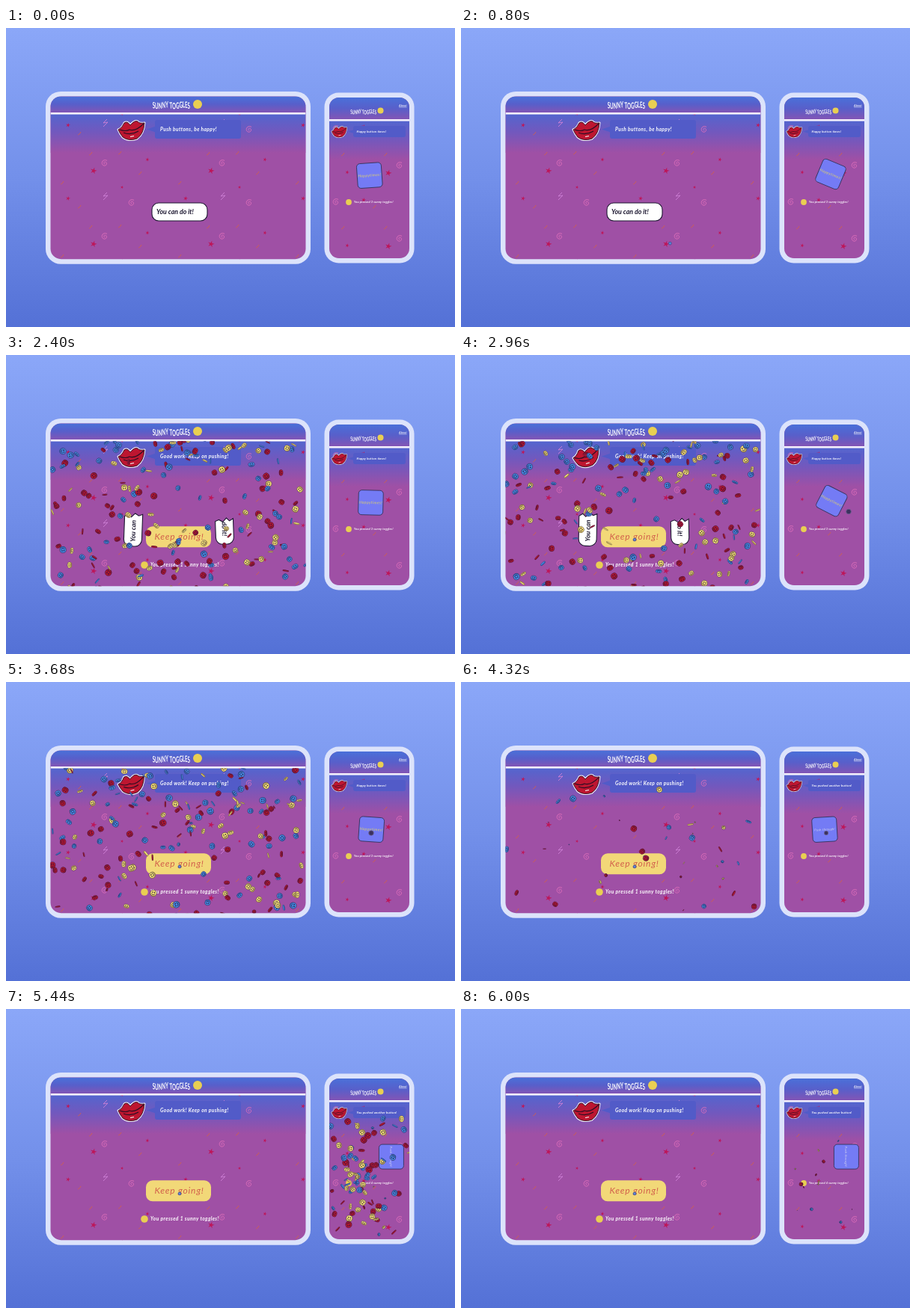
An HTML page with a canvas that plays this animation: 600x400 px, repeating every 6.08 s.

```html
<!DOCTYPE html>
<html lang="en">
<head>
<meta charset="utf-8">
<title>Sunny Toggles</title>
<style>
  html, body { margin: 0; width: 100%; height: 100%; overflow: hidden; background: #6f8ce8; }
  canvas { display: block; width: 600px; height: 400px; }
</style>
</head>
<body>
<canvas id="stage"></canvas>
<script>
const LOOP = 6080, BREAK = 1300, TAP = 4300, TAU = Math.PI * 2;
const FONT = 'Lato, "Open Sans", sans-serif';
const canvas = document.getElementById('stage');
const ctx = canvas.getContext('2d');
const ratio = Math.max(1, window.devicePixelRatio || 1);
canvas.width = 600 * ratio;
canvas.height = 400 * ratio;

function randomFrom(seed) {
  return () => {
    seed = (seed * 1664525 + 1013904223) >>> 0;
    return seed / 4294967296;
  };
}

// Eased value through [time, value] pairs.
function track(t, keys) {
  if (t <= keys[0][0]) return keys[0][1];
  for (let i = 1; i < keys.length; i++) {
    const [a, from] = keys[i - 1], [b, to] = keys[i];
    if (t < b) {
      const p = (t - a) / (b - a);
      return from + (to - from) * p * p * (3 - 2 * p);
    }
  }
  return keys[keys.length - 1][1];
}

function at(x, y, angle, draw) {
  ctx.save();
  ctx.translate(x, y);
  ctx.rotate(angle);
  draw();
  ctx.restore();
}

function box(x, y, w, h, r, fill, stroke, width = 1) {
  ctx.beginPath();
  ctx.roundRect(x, y, w, h, r);
  if (fill) { ctx.fillStyle = fill; ctx.fill(); }
  if (stroke) { ctx.strokeStyle = stroke; ctx.lineWidth = width; ctx.stroke(); }
}

function disc(x, y, r, fill, stroke, width = 0.8) {
  ctx.beginPath();
  ctx.arc(x, y, r, 0, TAU);
  ctx.fillStyle = fill;
  ctx.fill();
  if (stroke) { ctx.strokeStyle = stroke; ctx.lineWidth = width; ctx.stroke(); }
}

function text(str, x, y, size, color, { weight = 'bold', align = 'left', gap = size * 0.06 } = {}) {
  ctx.font = `italic ${weight} ${size}px ${FONT}`;
  ctx.letterSpacing = gap + 'px';
  ctx.textAlign = align;
  ctx.textBaseline = 'alphabetic';
  ctx.fillStyle = color;
  ctx.fillText(str, x, y);
  ctx.letterSpacing = '0px';
}

function shade(y0, y1, ...stops) {
  const g = ctx.createLinearGradient(0, y0, 0, y1);
  stops.forEach((c, i) => g.addColorStop(i / (stops.length - 1), c));
  return g;
}

const doodles = {
  spiral(s) {
    ctx.strokeStyle = '#e070ba';
    ctx.beginPath();
    for (let a = 0; a < 12; a += 0.3) {
      const r = a * 0.4 * s;
      ctx.lineTo(Math.cos(a) * r, Math.sin(a) * r);
    }
    ctx.stroke();
  },
  star(s) {
    ctx.fillStyle = '#bd1659';
    ctx.beginPath();
    for (let i = 0; i < 10; i++) {
      const r = (i % 2 ? 1.6 : 4.6) * s, a = i * TAU / 10 - 1.3;
      ctx.lineTo(Math.cos(a) * r, Math.sin(a) * r);
    }
    ctx.fill();
  },
  bolt() {
    ctx.strokeStyle = '#cf80d6';
    ctx.beginPath();
    ctx.moveTo(2, -5);
    ctx.lineTo(-3, 0);
    ctx.lineTo(3, -1);
    ctx.lineTo(-3, 5);
    ctx.stroke();
  },
  dash() {
    ctx.strokeStyle = '#d0604f';
    ctx.beginPath();
    ctx.moveTo(-1.8, 2);
    ctx.quadraticCurveTo(1, 1, 2, -2);
    ctx.stroke();
  }
};

const deskDoodles = [
  ['spiral', 132, 181, 1], ['spiral', 168, 234, 1], ['star', 117, 191, 1], ['star', 83, 130, 0.7],
  ['bolt', 133, 225, 1], ['star', 189, 176, 0.6], ['dash', 98, 141, 1], ['dash', 113, 168, 1],
  ['dash', 152, 167, 1], ['dash', 179, 194, 1], ['dash', 75, 207, 1], ['star', 155, 213, 0.5]
];
const phoneDoodles = [
  ['spiral', 526, 184, 1], ['spiral', 441, 233, 1], ['star', 511, 194, 1], ['star', 478, 230, 0.7],
  ['dash', 492, 239, 1], ['dash', 507, 267, 1], ['dash', 450, 267, 1], ['star', 456, 193, 0.6]
];

function pattern(list, x, y, w, h) {
  ctx.lineWidth = 0.9;
  for (const [kind, px, py, s] of list)
    for (let i = -2; i < 4; i++)
      for (let j = -2; j < 3; j++) {
        const dx = px + i * 157, dy = py + j * 98;
        if (dx > x - 6 && dx < x + w + 6 && dy > y - 6 && dy < y + h + 6)
          at(dx, dy, 0, () => doodles[kind](s));
      }
}

function title(x, y, size) {
  ctx.font = `bold ${size}px ${FONT}`;
  ctx.textAlign = 'left';
  ctx.fillStyle = '#fff';
  let pen = x;
  [...'SUNNY TOGGLES'].forEach((c, i) => {
    at(pen, y + Math.sin(i * 1.1) * size * 0.16, -0.05, () => {
      ctx.scale(1, 1.9);
      ctx.fillText(c, 0, 0);
    });
    pen += ctx.measureText(c).width;
  });
}

function lips(x, y, s, angle) {
  at(x, y, angle, () => {
    ctx.scale(s, s);
    ctx.lineJoin = 'round';
    const shape = new Path2D('M-17-1Q-12-3-9-10Q-5-13-1-7Q5-14 9-12Q11-9 18-10Q17 5 8 11Q-3 15-11 9Q-15 4-17-1Z');
    ctx.strokeStyle = '#f4eaf4';
    ctx.lineWidth = 3;
    ctx.stroke(shape);
    ctx.fillStyle = '#bd1630';
    ctx.fill(shape);
    ctx.strokeStyle = '#2a0d22';
    ctx.lineWidth = 0.9;
    ctx.stroke(shape);
    ctx.lineWidth = 1.1;
    ctx.stroke(new Path2D('M-15-1Q-7 2-2-1Q6 2 17-9M-10 3Q0 7 10 1'));
    ctx.strokeStyle = '#fff';
    ctx.stroke(new Path2D('M-1 8.5L4 7.5'));
  });
}

function makePieces(count, seed, first, last, place) {
  const rnd = randomFrom(seed);
  return Array.from({ length: count }, () => {
    const [x, y] = place(rnd);
    return {
      x, y,
      end: first + rnd() * (last - first),
      hue: Math.floor(rnd() * 3),
      fall: 30 + rnd() * 35,
      turn: rnd() * TAU,
      spin: (rnd() - 0.5) * 5,
      flip: rnd() * TAU,
      tumble: 3 + rnd() * 5,
      size: 3.4 + rnd() * 0.9
    };
  });
}

const deskPieces = makePieces(250, 71, 3750, 4500, rnd => {
  const x = 56 + rnd() * 348;
  let y = 55 + rnd() * 258;
  if (Math.abs(x - 258) < 72 && y > 150 && y < 222 && rnd() < 0.8) y -= 85;
  return [x, y];
});
const phonePieces = makePieces(135, 19, 5200, 6100, rnd =>
  rnd() < 0.35
    ? [467 + (rnd() + rnd() - 1) * 32, 200 + (rnd() + rnd() - 1) * 50]
    : [432 + rnd() * 106, 118 + rnd() * 180]);

const coinFill = ['#b3152f', '#4387de', '#f2df72'];
const coinSide = ['#6d0d25', '#24529d', '#a48a35'];

function coin(p, scale, age) {
  const r = p.size * scale;
  const squash = Math.max(0.16, Math.abs(Math.cos(p.flip + p.tumble * age)));
  ctx.rotate(p.turn + p.spin * age);
  ctx.beginPath();
  ctx.ellipse(0, 0.8 * scale, r, r * squash, 0, 0, TAU);
  ctx.fillStyle = coinSide[p.hue];
  ctx.fill();
  ctx.scale(1, squash);
  disc(0, 0, r, coinFill[p.hue], '#33204a', 0.5);
  if (squash < 0.3) return;
  ctx.fillStyle = ctx.strokeStyle = '#26163b';
  ctx.fillRect(-r * 0.45, -r * 0.45, r * 0.28, r * 0.4);
  ctx.fillRect(r * 0.17, -r * 0.45, r * 0.28, r * 0.4);
  ctx.lineWidth = 0.7;
  ctx.beginPath();
  ctx.arc(0, 0, r * 0.58, 0.3, Math.PI - 0.3);
  ctx.stroke();
}

function confetti(t, pieces, start, ox, oy) {
  if (t < start) return;
  const age = (t - start) / 1000, out = 1 - Math.exp(-5.5 * age);
  for (const p of pieces) {
    const scale = Math.min(1, (p.end - t) / 120, age * 8);
    if (scale <= 0) continue;
    const x = ox + (p.x - ox) * out + Math.sin(p.turn + age * 2) * 2;
    const y = oy + (p.y - oy) * out + p.fall * Math.max(0, age - 0.6);
    at(x, y, 0, () => coin(p, scale, age));
  }
}

const jag = [[3, -12], [6, -7], [2, -3], [7, 2], [4, 7], [6, 12]];

function halfButton(side, t) {
  const left = side < 0, mid = left ? -16 : 21;
  const move = (a, b) => track(t, [[BREAK, 0], [1520, a], [2150, b], [3000, b + side * 0.6]]);
  const dx = left ? move(-18, -46) : move(8, 39);
  const dy = left ? move(-12, -11) : move(-9, -9);
  const turn = side * track(t, [[BREAK, 0], [1520, 0.5], [2150, 1.53], [3000, 1.55]]);
  ctx.save();
  ctx.globalAlpha = track(t, [[3100, 1], [3500, 0]]);
  at(232 + mid + dx, 246 + dy, turn, () => {
    ctx.translate(-mid, 0);
    ctx.beginPath();
    jag.forEach(([x, y]) => ctx.lineTo(x, y));
    ctx.arcTo(side * 37, 12, side * 37, 0, 9);
    ctx.arcTo(side * 37, -12, 3, -12, 9);
    ctx.closePath();
    ctx.fillStyle = '#fff';
    ctx.fill();
    ctx.strokeStyle = '#1c1730';
    ctx.lineWidth = 1.1;
    ctx.stroke();
    ctx.clip();
    text(left ? 'You can' : 'do it!', left ? -31 : 7, 3.2, 8.8, '#1c1730', { gap: 0 });
  });
  ctx.restore();
}

function yellowButton(t) {
  const sx = track(t, [[BREAK, 0], [1520, 0.47], [1750, 1.1], [1900, 0.95], [2050, 1]]);
  const sy = track(t, [[BREAK, 0.4], [1520, 1.14], [1750, 0.93], [2000, 1]]);
  at(230.5, 243.3, 0, () => {
    ctx.scale(sx, sy);
    box(-43.5, -14, 87, 28, 9, '#f2d878');
    text('Keep going!', 1, 4, 12, '#d2604c', { weight: 'normal', align: 'center', gap: 0.8 });
  });
}

function frame(x, y, w, h, r, bar, list) {
  box(x - 6.5, y - 6.5, w + 13, h + 13, r + 6, '#dce3fb');
  ctx.save();
  box(x, y, w, h, r, '#9f50a5');
  ctx.clip();
  ctx.fillStyle = shade(bar, bar + 54, '#5066d0', '#7358bd', '#9f50a5');
  ctx.fillRect(x, bar, w, 54);
  pattern(list, x, bar, w, y + h - bar);
  ctx.fillStyle = shade(y, bar, '#4a70d9', '#585fca', '#8255b5');
  ctx.fillRect(x, y, w, bar - y);
  ctx.fillStyle = '#f3eefb';
  ctx.fillRect(x, bar, w, 2.6);
}

function speech(x, y, w, h, str, size, pad) {
  const mid = y + h / 2;
  box(x, y, w, h, 3, '#525bc8');
  ctx.beginPath();
  ctx.moveTo(x + 1, mid - h * 0.16);
  ctx.lineTo(x - h * 0.45, mid);
  ctx.lineTo(x + 1, mid + h * 0.16);
  ctx.fill();
  text(str, x + pad, mid + size * 0.34, size, '#fff');
}

function clipTo(x, y, w, h) {
  ctx.beginPath();
  ctx.rect(x, y, w, h);
  ctx.clip();
}

function desktop(t) {
  const broken = t >= BREAK;
  frame(59.5, 91.5, 341, 217.7, 14, 113, deskDoodles);
  title(196, 107.5, 6.1);
  disc(256, 102, 6, '#e9cf52');
  speech(199, 123, 115, 25, broken ? 'Good work! Keep on pushing!' : 'Push buttons, be happy!', 6.6, 7);
  const sway = broken ? track(t, [[BREAK, 0], [1900, 0.11], [3700, 0.11], [4400, 0]]) : 0;
  lips(167, 137, 1, -sway * Math.abs(Math.sin((t - BREAK) / 350)));
  if (broken) {
    yellowButton(t);
    disc(185, 281, 4.8, '#e9cf52');
    text('You pressed 1 sunny toggles!', 193, 283.3, 6.7, '#fff');
    halfButton(-1, t);
    halfButton(1, t);
  } else {
    box(195, 234, 74, 24, 9, '#fff', '#1c1730', 1.1);
    text('You can do it!', 201, 249.2, 8.8, '#1c1730', { gap: 0 });
  }
  if (t > 600) {
    const x = track(t, [[600, 300], [1150, 232]]), y = track(t, [[600, 306], [1150, 247]]);
    disc(x, y, 1.9, '#5f86dc', '#39508f');
  }
  clipTo(59, 115.6, 342, 194);
  confetti(t, deskPieces, 1700, 231, 243);
  ctx.restore();
}

const roll = [[0, -4], [740, 24], [1180, -3], [1550, 20], [2250, 0], [2420, 1.5],
  [2960, 27], [3500, 3], [3700, 4], [4250, 0], [4380, -6], [4800, 94], [4920, 90]];

function phone(t) {
  const tapped = t >= TAP;
  frame(432, 93, 107, 215, 13, 122, phoneDoodles);
  title(460.5, 115, 4.2);
  disc(500.5, 110.5, 4, '#e9cf52');
  text('About', 525, 105, 4.2, '#fff', { weight: 'normal', gap: 0 });
  ctx.fillStyle = '#fff';
  ctx.fillRect(525, 105.7, 10.5, 0.5);
  speech(464, 131, 70, 15, tapped ? 'You pushed another button!' : 'Happy button times!', 4.05, 4.6);
  lips(445, 139, 0.57, 0);

  const deg = track(t, roll), angle = deg * Math.PI / 180;
  at(487 + deg * 0.31, 197.6 - 3 * Math.abs(Math.sin(angle * 2)), angle, () => {
    box(-16.5, -16.5, 33, 33, 4.5, '#747bf5', '#34345f', 0.9);
    if (tapped) text('Push through!', 0, 1.5, 4.2, '#d5d4ed', { weight: 'normal', align: 'center' });
    else text('Happytimes!', 0, 1.6, 5.1, '#e2d365', { weight: 'normal', align: 'center', gap: 0.4 });
  });

  disc(458, 233, 3.9, '#e9cf52');
  text(`You pressed ${tapped ? 4 : 3} sunny toggles!`, 465, 234.2, 3.85, '#fff');

  if (t > 2600 && t < 4500) {
    ctx.save();
    ctx.globalAlpha = track(t, [[2600, 0], [2800, 1], [4320, 1], [4500, 0]]);
    const x = track(t, [[2600, 530], [2960, 518], [3600, 488]]);
    const y = track(t, [[2600, 226], [2960, 209.5], [3600, 202]]);
    disc(x, y, tapped ? 2.7 : 3.3, '#3a315e', '#6c6294');
    ctx.restore();
  }
  clipTo(432, 124.6, 107, 184);
  confetti(t, phonePieces, TAP + 60, 487, 198);
  ctx.restore();
}

function paint(t) {
  ctx.setTransform(ratio, 0, 0, ratio, 0, 0);
  ctx.fillStyle = shade(0, 400, '#8ba7f8', '#7390ea', '#5471d6');
  ctx.fillRect(0, 0, 600, 400);
  desktop(t);
  phone(t);
}

const begin = performance.now();
function tick() {
  paint((performance.now() - begin) % LOOP);
  requestAnimationFrame(tick);
}
tick();
</script>
</body>
</html>
```
